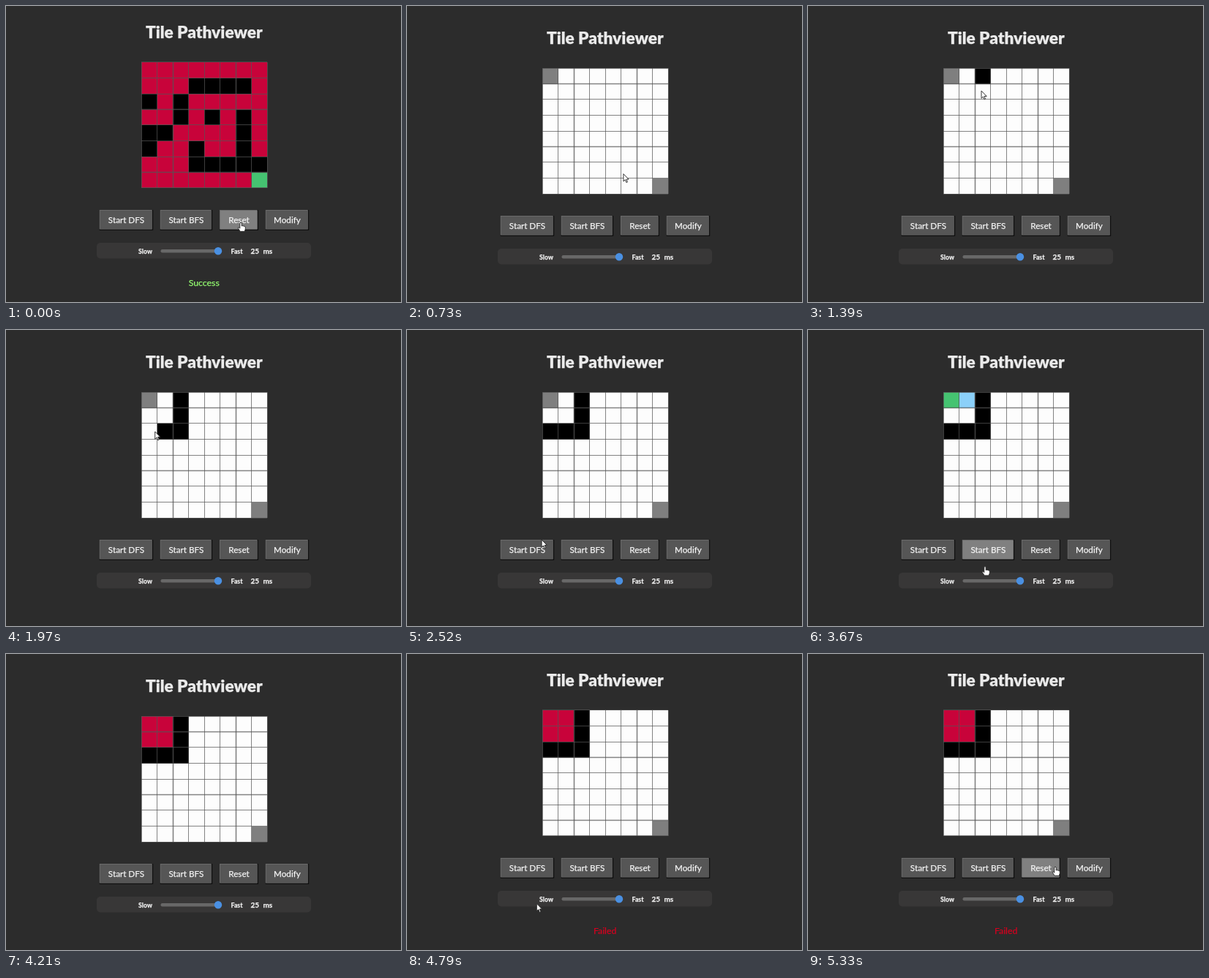
Recreate the animation shown at these times as an HTML page. Size 540 by 405 pixels, loop 5360 ms.

```html
<!DOCTYPE html>
<html lang="en">
<head>
<meta charset="utf-8">
<title>Tile Pathviewer</title>
<style>
html, body { margin: 0; width: 100%; height: 100%; overflow: hidden; background: #2c2c2c; }
svg { display: block; width: 540px; height: 405px; font-family: Lato, "Open Sans", sans-serif; }
text { fill: currentColor; stroke: currentColor; stroke-width: .25px; color: #f4f4f4; text-anchor: middle; }
</style>
</head>
<body>
<svg viewBox="0 0 540 405">
  <rect width="540" height="405" fill="#2c2c2c"/>
  <g id="page">
    <text x="270.8" y="51.7" font-size="22.7" font-weight="900" style="color:#eaeaea">Tile Pathviewer</text>
    <g id="cells" shape-rendering="crispEdges"></g>
    <g id="lines" stroke="#555" stroke-opacity=".72"></g>
    <g id="buttons" font-size="11.7"></g>
    <rect x="124" y="332" width="293" height="21.5" rx="5" fill="#383737"/>
    <rect x="211.5" y="341" width="80" height="4.4" rx="2.2" fill="#686868"/>
    <circle cx="290" cy="343.2" r="5.2" fill="#4a90e2"/>
    <g font-size="8.7" font-weight="700">
      <text x="190.5" y="346.5">Slow</text>
      <text x="315.5" y="346.5">Fast</text>
      <text x="340.3" y="347" font-size="10">25</text>
      <text x="357.8" y="347" font-size="10">ms</text>
    </g>
  </g>
  <text id="status" x="270.7" y="382.5" font-size="12.3"></text>
  <g id="cursor" stroke="#222" stroke-width=".9" stroke-linejoin="round" fill="#fff">
    <path id="arrow" d="M0 0V10.2L2.4 8L4 11.8L5.6 11.1L4 7.4H7.2Z"/>
    <path id="hand" d="M-.2 1Q1 -.9 2.2 1V5L3.6 4.7L5 5.1L6.3 5.5Q7.3 5.8 7.3 7V9.2L6.2 12.4H.2L-2.6 8.2Q-3 6.8 -1.7 7L-.2 8.2Z"/>
  </g>
</svg>
<script>
const LOOP = 5360, N = 8, SIZE = 21.5, LEFT = 185, TOP = 85;
const WHITE = '#fdfdfd', GRAY = '#7f7f7f', BLACK = '#000', RED = '#c8033a', GREEN = '#45c371', BLUE = '#8bd0f9';
const RESET = 420, PAINT = 1190, PAINT_STEP = 215, SEARCH = 3610, SEARCH_STEP = 42, FAIL = 4270;
const LAG = 70; // hover follows the pointer late

const solved = [...'...........####.#.#.......#.#.#.##....#.#..#..#....##### .......G'.replace(' ', '')];
const legend = { '.': RED, '#': BLACK, G: GREEN };
const walls = [2, 10, 18, 17, 16]; // cell indices, in painting order

// time, x, y of the pointer tip
const path = [
  [0, 320, 296], [390, 320, 296], [730, 296, 230],
  [PAINT, 238, 97], [1390, 237, 116], [1620, 238, 139], [2050, 196, 139],
  [2520, 184, 287], [3000, 241, 302], [3600, 243, 303], [3670, 241, 323], [3880, 240, 425],
  [4670, 176, 425], [4860, 178, 294], [5330, 337, 291], [LOOP, 337, 291]
];

const labels = [['Start DFS', 127.7, 73.5], ['Start BFS', 210.7, 71.5], ['Reset', 292, 53], ['Modify', 354.7, 59.5]];

// breadth-first search, recorded as one colour change per step
function search() {
  const steps = [[0, GREEN]], seen = new Set([0, ...walls]), queue = [0];
  while (queue.length) {
    const cell = queue.shift(), col = cell % N;
    if (cell) steps.push([cell, GREEN]);
    const near = [col < N - 1 && cell + 1, cell + N < N * N && cell + N, col > 0 && cell - 1, cell >= N && cell - N];
    for (const next of near) {
      if (next === false || seen.has(next)) continue;
      seen.add(next);
      queue.push(next);
      steps.push([next, BLUE]);
    }
    steps.push([cell, RED]);
  }
  return steps;
}
const steps = search();

const $ = id => document.getElementById(id);
function set(el, attrs) {
  for (const k in attrs) el.setAttribute(k, attrs[k]);
  return el;
}
function make(parent, tag, attrs) {
  return set(parent.appendChild(document.createElementNS('http://www.w3.org/2000/svg', tag)), attrs);
}

const cells = solved.map((_, i) => make($('cells'), 'rect', {
  x: LEFT + i % N * SIZE, y: TOP + Math.floor(i / N) * SIZE, width: SIZE, height: SIZE
}));

const offset = i => Math.floor(i * SIZE) + .5;
const weight = bold => bold ? 1.6 : 1;
const rows = [];
for (let i = 0; i <= N; i++) {
  make($('lines'), 'path', { d: `M${LEFT + offset(i)} ${TOP}v172`, 'stroke-width': weight(i % 4 === 2) });
  rows.push(make($('lines'), 'path', {}));
}

const faces = labels.map(([label, x, w]) => {
  const g = $('buttons');
  make(g, 'rect', { x, y: 287, width: w, height: 28, fill: '#101010' });
  make(g, 'rect', { x, y: 287, width: w - 1.5, height: 26.5, fill: '#6a6a6a' });
  const face = make(g, 'rect', { x: x + 1, y: 288, width: w - 2.5, height: 25.5 });
  make(g, 'text', { x: x + w / 2, y: 305.3 }).textContent = label;
  return face;
});

function pointer(t) {
  const i = Math.max(1, path.findIndex(p => p[0] >= t));
  const [t0, x0, y0] = path[i - 1], [t1, x1, y1] = path[i];
  const k = Math.max(0, (t - t0) / (t1 - t0));
  return [x0 + (x1 - x0) * k, y0 + (y1 - y0) * k];
}

function colours(t) {
  if (t < RESET) return solved.map(c => legend[c]);
  const out = Array(N * N).fill(WHITE);
  out[0] = out[N * N - 1] = GRAY;
  walls.forEach((cell, i) => { if (t >= PAINT + i * PAINT_STEP) out[cell] = BLACK; });
  steps.forEach(([cell, colour], i) => { if (t >= SEARCH + i * SEARCH_STEP) out[cell] = colour; });
  return out;
}

function draw(t) {
  const solvedView = t < RESET, raised = solvedView || t >= FAIL;
  const shift = raised ? -8 : 0;
  set($('page'), { transform: `translate(0 ${shift})` });
  colours(t).forEach((fill, i) => set(cells[i], { fill }));

  // every fourth row line is heavy and the one after it sits a pixel higher
  const heavy = raised ? 3 : 1;
  rows.forEach((row, i) => {
    const y = TOP + offset(i) - (i % 4 === (heavy + 1) % 4 ? 1 : 0);
    set(row, { d: `M${LEFT} ${y}h172`, 'stroke-width': weight(i % 4 === heavy) });
  });

  const [hx, hy] = pointer(t - LAG);
  let over = false;
  labels.forEach(([, x, w], i) => {
    const hit = hx >= x && hx <= x + w && hy >= 287 + shift && hy <= 315 + shift;
    over = over || hit;
    set(faces[i], { fill: hit ? '#808080' : '#565656' });
  });

  $('status').textContent = solvedView ? 'Success' : raised ? 'Failed' : '';
  $('status').style.color = solvedView ? '#94fb70' : '#d5001f';

  const [x, y] = pointer(t);
  set($('cursor'), { transform: `translate(${x.toFixed(1)} ${y.toFixed(1)})` });
  $('hand').style.display = over ? '' : 'none';
  $('arrow').style.display = over ? 'none' : '';
}

const start = performance.now();
function tick(now) {
  draw(Math.max(0, now - start) % LOOP);
  requestAnimationFrame(tick);
}
draw(0);
requestAnimationFrame(tick);
</script>
</body>
</html>
```
